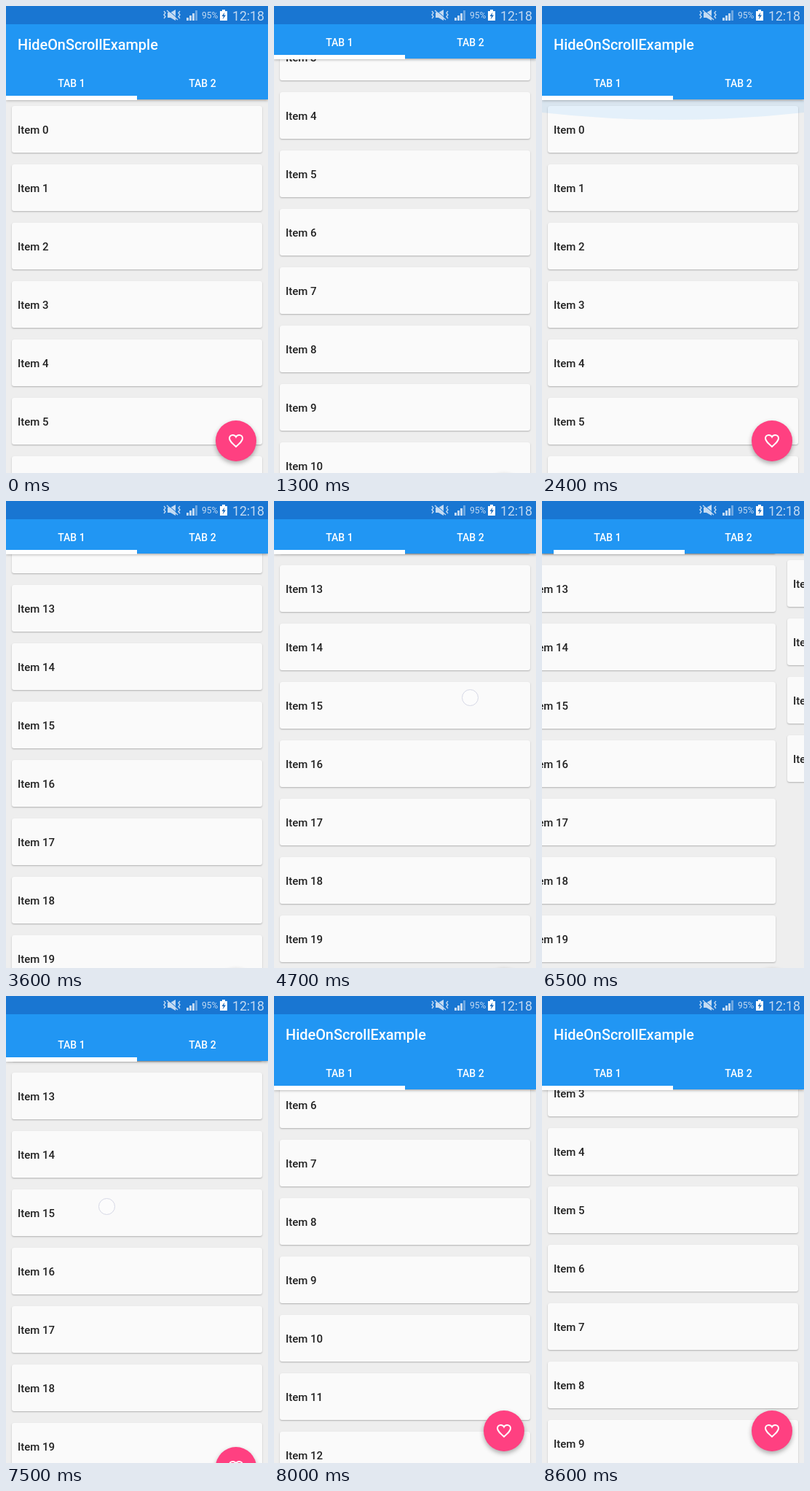
Animation, 360 px wide and 640 px high, one loop 8700 ms. Source, as an HTML page:

```html
<!DOCTYPE html>
<html lang="en">
<head>
<meta charset="utf-8">
<title>Hide on scroll</title>
<style>
html, body { margin: 0; width: 100%; height: 100%; overflow: hidden; background: #eee; }
#app { position: relative; width: 360px; height: 640px; overflow: hidden; background: #eee;
  color: #212121; font: 500 15px Roboto, sans-serif; }
#app > *, .page, .card, #bar > * { position: absolute; }
#pager, .page { left: 0; top: 0; width: 360px; height: 640px; }
#page2 { left: 360px; }
.card { left: 8px; width: 336px; height: 64px; padding-left: 8px; line-height: 66px;
  border-radius: 3px; background: #fafafa; box-shadow: 0 1px 2px rgba(0,0,0,.26); }
#bar { left: 0; top: 25px; width: 360px; height: 103px; background: #2196f3; color: #fff;
  box-shadow: 0 1px 4px rgba(0,0,0,.4); }
#title { left: 16px; top: 0; font-size: 19.9px; line-height: 58px; }
.tab { top: 56px; width: 180px; font-size: 14px; line-height: 51px; text-align: center; }
#line { left: 0; top: 98px; width: 180px; height: 6px; background: #fff; }
#status { left: 0; top: 0; }
#fab { left: 288px; top: 568px; width: 56px; height: 56px; border-radius: 50%;
  background: #ff4081; box-shadow: 0 3px 6px rgba(0,0,0,.32); }
#fab svg { position: absolute; left: 16px; top: 16px; }
#glow { left: 0; top: 129px; transform-origin: top; }
#touch { left: -12px; top: -12px; width: 21px; height: 21px; border: 1.5px solid #d6d8e6;
  border-radius: 50%; background: rgba(255,255,255,.4); }
</style>
</head>
<body>
<div id="app">
  <div id="pager">
    <div class="page" id="page1"></div>
    <div class="page" id="page2"></div>
  </div>
  <svg id="glow" width="360" height="30"><path d="M0 0V17Q180 37 360 17V0Z" fill="#2196f3" fill-opacity=".1"/></svg>
  <div id="bar">
    <div id="title">HideOnScrollExample</div>
    <div class="tab" style="left:0">TAB 1</div>
    <div class="tab" style="left:180px">TAB 2</div>
    <div id="line"></div>
  </div>
  <div id="fab">
    <svg width="24" height="24" fill="none" stroke="#fff" stroke-width="2">
      <path d="M12 20C6.3 15 3 12 3 8.5C3 6 5 4 7.5 4Q10.6 4 12 6.6Q13.4 4 16.5 4C19 4 21 6 21 8.5C21 12 17.7 15 12 20Z"/>
    </svg>
  </div>
  <div id="touch"></div>
  <svg id="status" width="360" height="25" fill="#c3daf2" font-family="Roboto, sans-serif" font-weight="400">
    <rect width="360" height="25" fill="#1976d2"/>
    <path d="M222 9h4l7-4v15l-7-4h-4z"/>
    <path d="M217 7l2 2.5-2 2.5 2 2.5-2 2.5M239 7l-2 2.5 2 2.5-2 2.5 2 2.5M221 6l15 13" fill="none" stroke="#c3daf2" stroke-width="1.4"/>
    <path d="M222 5l15 13" stroke="#1976d2"/>
    <path d="M248 16h3v4h-3zM252 13h3v7h-3zM256 10h3v10h-3z"/>
    <path d="M260 6h3v14h-3z" opacity=".5"/>
    <text x="269" y="17" font-size="12">95%</text>
    <path d="M297 5h4v2h3v13h-10v-13h3z" fill="#fff"/>
    <path d="M300.500 8.500l-4 5.500h2.500l-1.500 4.500 4.500-6h-2.700z" fill="#1565b8"/>
    <text x="355" y="19.500" font-size="17.700" text-anchor="end">12:18</text>
  </svg>
</div>
<script>
const LOOP = 8700, STEP = 100, BAR = 56, FAB = 72, WIDTH = 360, HOLD = 300;
const $ = id => document.getElementById(id);

// progress from 0 to 1 between two times
const ramp = (t, a, b) => Math.min(1, Math.max(0, (t - a) / (b - a)));
const fling = (t, a, b) => 1 - (1 - ramp(t, a, b)) ** 3;
const swipe = (t, a, b) => { const k = ramp(t, a, b); return k * k * (3 - 2 * k); };

const hidden = t => BAR * (ramp(t, 600, 900) - ramp(t, 1500, 1800)
  + ramp(t, 2700, 2900) - ramp(t, 7400, 7730));
const scrolled = t => 283 * (fling(t, 800, 1300) - fling(t, 1700, 2300))
  + 1033 * fling(t, 2850, 3915) - 757 * fling(t, 7700, 8600);
const page = t => swipe(t, 4700, 5300) - swipe(t, 5600, 6700);
const glow = t => ramp(t, 2200, 2400) - ramp(t, 2400, 2600);

// a finger goes down here, then moves with the content it drags
const touches = [
  { start: 600, x: 150, y: 300 },
  { start: 1500, x: 150, y: 272 },
  { start: 2700, x: 150, y: 300 },
  { start: 4700, x: 270, y: 270 },
  { start: 5500, x: 171, y: 270 },
  { start: 7400, x: 139, y: 272 }
];

function fill(list, count) {
  for (let i = 0; i < count; i++) {
    const card = document.createElement('div');
    card.className = 'card';
    card.textContent = 'Item ' + i;
    card.style.top = 137 + 80 * i + 'px';
    list.append(card);
  }
}

function move(id, x, y) {
  $(id).style.transform = `translate(${Math.round(x)}px, ${Math.round(y)}px)`;
}

function draw(t) {
  const h = hidden(t), p = page(t), g = glow(t);
  move('pager', -WIDTH * p, -h);
  move('page1', 0, -scrolled(t));
  move('bar', 0, -h);
  move('line', WIDTH / 2 * p, 0);
  move('fab', 0, h * FAB / BAR);
  $('glow').style.opacity = g;
  $('glow').style.transform = `scaleY(${g})`;
  const finger = touches.find(f => t >= f.start && t < f.start + HOLD);
  $('touch').style.opacity = finger ? 1 : 0;
  if (finger) {
    const { start, x, y } = finger;
    move('touch', x + WIDTH * (page(start) - p), y + hidden(start) - h);
  }
}

fill($('page1'), 30);
fill($('page2'), 4);

const start = performance.now();
function tick() {
  const t = (performance.now() - start) % LOOP;
  draw(Math.floor(t / STEP) * STEP);
  requestAnimationFrame(tick);
}
tick();
</script>
</body>
</html>
```
